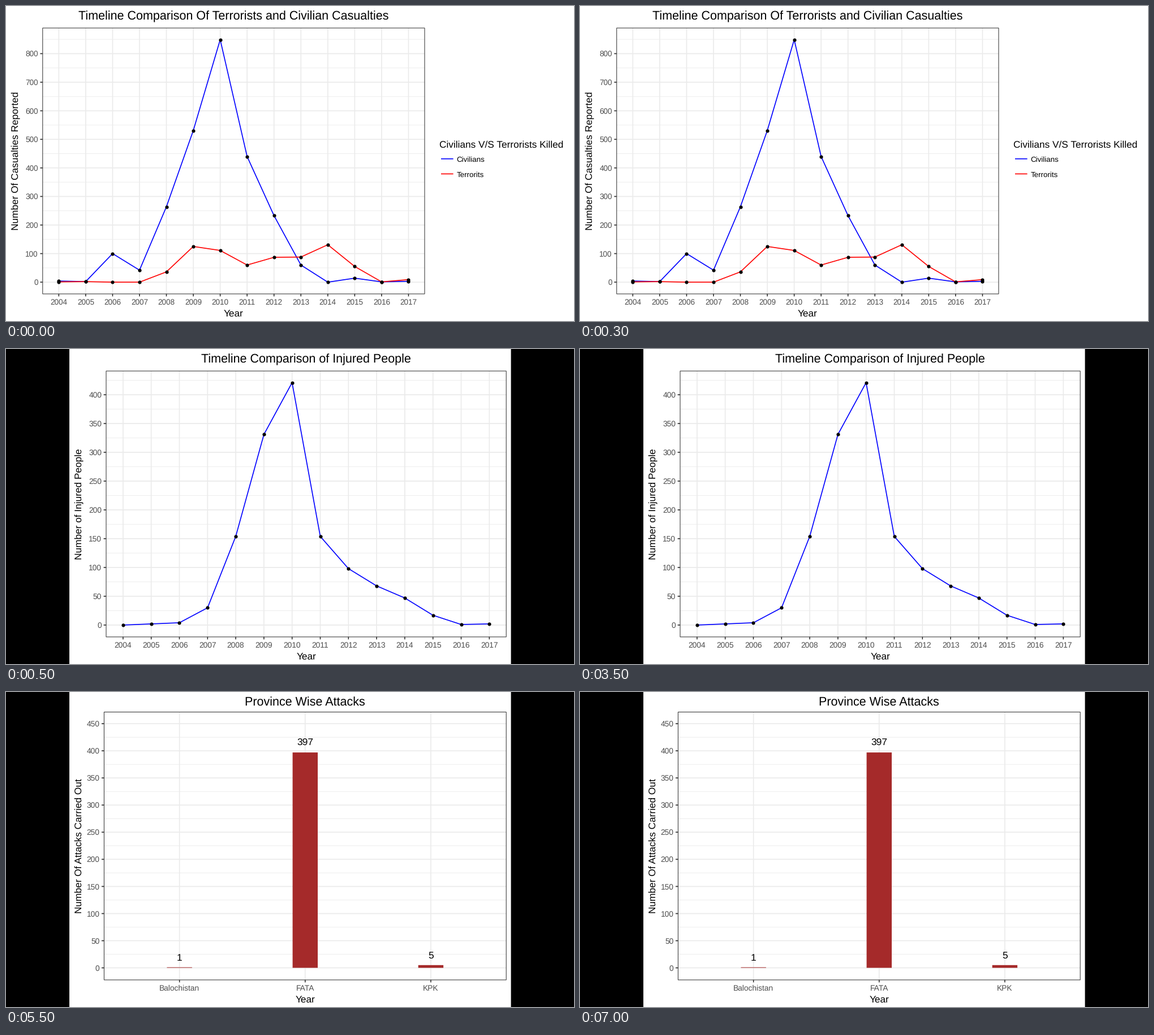
A matplotlib script that plays this animation: 1004x558 px, repeating every 8 s.

```python
import matplotlib.pyplot as plt
from matplotlib.animation import FuncAnimation
from matplotlib.patches import Rectangle

W, H, DPI = 1004, 558, 64
PX = 72 / DPI  # points per pixel
STEP_MS, STEPS = 500, 16
GRID, DARK, TICK_TEXT = "#ebebeb", "#333333", "#4d4d4d"
YEARS = [str(y) for y in range(2004, 2018)]

plt.rcParams.update({
    "font.family": "Liberation Sans",
    "text.hinting": "none",
    "lines.solid_capstyle": "butt",
    "path.snap": False,
})
fig = plt.figure(figsize=(W / DPI, H / DPI), dpi=DPI, facecolor="white")


def new_scene():
    ax = fig.add_axes([0, 0, 1, 1])
    ax.set(xlim=(0, W), ylim=(H, 0))
    ax.axis("off")
    return ax


def line(ax, xs, ys, color, width=1.67, z=2):
    ax.plot(xs, ys, color=color, lw=width * PX, zorder=z)


def text(ax, x, y, s, size, color="black", ha="center", rotation=0):
    ax.text(x, y, s, fontsize=size * PX, color=color, ha=ha, va="baseline",
            rotation=rotation, rotation_mode="anchor", zorder=6)


def block(ax, x0, y0, x1, y1, color, z):
    ax.add_patch(Rectangle((x0, y0), x1 - x0, y1 - y0, fc=color, lw=0, zorder=z))


class Panel:
    """A bordered plot panel with a discrete x axis and a linear y axis."""

    def __init__(self, box, names, zero, scale, major, top, tick_size):
        self.ax = ax = new_scene()
        self.box = left, upper, right, lower = box
        self.zero, self.scale = zero, scale
        self.step = (right - left) / (len(names) + 0.2)
        self.xs = [left + (i + 0.6) * self.step for i in range(len(names))]

        for v in range(major // 2, top + 1, major):
            line(ax, [left, right], [self.y(v)] * 2, GRID, 0.85, 1)
        for v in range(0, top + 1, major):
            y = self.y(v)
            line(ax, [left, right], [y, y], GRID, 1.7, 1)
            line(ax, [left - 4.4, left], [y, y], DARK)
            text(ax, left - 7.8, y + 0.36 * tick_size, str(v), tick_size,
                 TICK_TEXT, "right")
        for x, name in zip(self.xs, names):
            line(ax, [x, x], [upper, lower], GRID, 1.7, 1)
            line(ax, [x, x], [lower, lower + 4.4], DARK)
            text(ax, x, 528.8, name, tick_size, TICK_TEXT)
        ax.add_patch(Rectangle((left, upper), right - left, lower - upper,
                               fill=False, ec=DARK, lw=1.05 * PX, zorder=5))

    def y(self, value):
        return self.zero - self.scale * value

    def titles(self, title, y_title, y_title_x):
        left, upper, right, lower = self.box
        mid = (left + right) / 2
        text(self.ax, mid, 24.8, title, 21.5)
        text(self.ax, mid, 550, "Year", 17.2)
        text(self.ax, y_title_x, (upper + lower) / 2, y_title, 17.2, rotation=90)

    def series(self, values, color):
        ys = [self.y(v) for v in values]
        line(self.ax, self.xs, ys, color, z=3)
        self.ax.plot(self.xs, ys, "o", color="black", ms=6.2 * PX, mew=0, zorder=4)

    def bars(self, values, color):
        half = self.step / 10
        for x, v in zip(self.xs, values):
            block(self.ax, x - half, self.y(v), x + half, self.zero, color, 3)
            text(self.ax, x, self.y(v) - 12, str(v), 17.4)

    def side_bands(self):
        block(self.ax, 0, 0, 112, H, "black", 0)
        block(self.ax, 892.6, 0, W, H, "black", 0)


def casualties():
    p = Panel((64.8, 39, 740, 510), YEARS, 489.2, 0.506, 100, 850, 13.5)
    p.titles("Timeline Comparison Of Terrorists and Civilian Casualties",
             "Number Of Casualties Reported", 21)
    p.series([4, 2, 100, 42, 264, 531, 849, 440, 233, 60, 0, 14, 1, 3], "blue")
    p.series([1, 2, 0, 0, 36, 125, 111, 60, 87, 88, 131, 55, 1, 9], "red")
    text(p.ax, 766, 250.8, "Civilians V/S Terrorists Killed", 17.2, ha="left")
    for y, name, color in [(270.7, "Civilians", "blue"), (297.4, "Terrorits", "red")]:
        line(p.ax, [769, 790.6], [y, y], color)
        text(p.ax, 796.4, y + 5.2, name, 13.4, ha="left")
    return p.ax


def injured():
    p = Panel((177, 39, 884.2, 510), YEARS, 489, 1.02, 50, 425, 13.8)
    p.titles("Timeline Comparison of Injured People",
             "Number of Injured People", 133.6)
    p.series([0, 2, 4, 30, 154, 331, 421, 154, 98, 68, 47, 17, 1, 2], "blue")
    p.side_bands()
    return p.ax


def attacks():
    p = Panel((173.4, 35.5, 884.2, 510), ["Balochistan", "FATA", "KPK"],
              488.6, 0.961, 50, 450, 13.7)
    p.titles("Province Wise Attacks", "Number Of Attacks Carried Out", 133.6)
    p.bars([1, 397, 5], "#a52a2a")
    p.side_bands()
    return p.ax


scenes = [casualties(), injured(), attacks()]
starts = [0, 500, 5500]


def update(i):
    current = sum(i * STEP_MS >= s for s in starts) - 1
    for k, ax in enumerate(scenes):
        ax.set_visible(k == current)
    return scenes


update(0)
anim = FuncAnimation(fig, update, frames=STEPS, interval=STEP_MS,
                     repeat=True, repeat_delay=0, blit=False)
plt.show()
```
